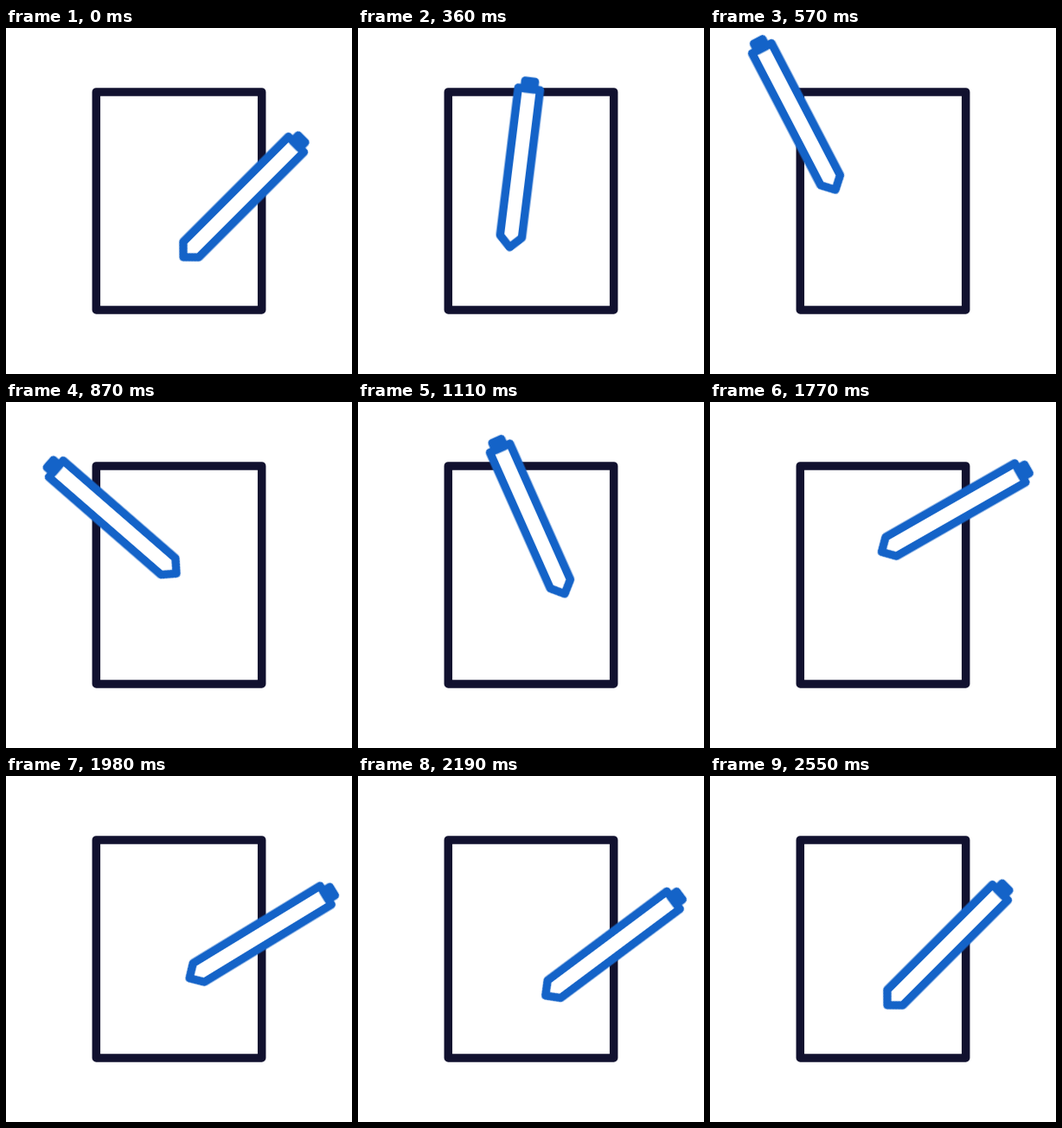
An HTML page without scripts for the animation above (2610 ms loop, 400 px wide and 400 px high).

```html
<!DOCTYPE html>
<html lang="en">
<head>
<meta charset="utf-8">
<title>Pencil and paper</title>
<style>
  html, body { margin: 0; width: 100%; height: 100%; overflow: hidden; background: #fff; }
  svg { display: block; width: 100%; height: 100%; }
  .paper, .pencil { fill: #fff; stroke-width: 9.5; stroke-linejoin: round; }
  .paper { stroke: #11112f; }
  .pencil { stroke: #1463c8; }
  .cap { fill: #1463c8; }

  .move-x, .move-y, .turn {
    --ease: cubic-bezier(.333, 0, .667, 1);
    --swing: cubic-bezier(.55, 0, .667, 1);
    animation: 2610ms var(--ease) infinite;
  }
  .move-x { animation-name: move-x; }
  .move-y { animation-name: move-y; }
  .turn { animation-name: turn; }

  @keyframes move-x {
    0% { transform: translateX(304px); animation-timing-function: cubic-bezier(.55, 0, .667, 1); }
    24.14%, 28.35% { transform: translateX(74px); }
    59%, 63.22% { transform: translateX(316.5px); }
    79.31% { transform: translateX(333.6px); }
    97.7%, 100% { transform: translateX(304px); }
  }
  @keyframes move-y {
    0% { transform: translateY(166px); animation-timing-function: cubic-bezier(.55, 0, .667, 1); }
    24.14% { transform: translateY(60px); }
    34.48% { transform: translateY(108px); }
    47.13% { transform: translateY(88px); }
    50.57%, 63.79% { transform: translateY(90.2px); }
    79.31% { transform: translateY(171px); }
    97.7%, 100% { transform: translateY(166px); }
  }
  @keyframes turn {
    0% { transform: rotate(45deg); }
    31.88% { transform: rotate(-49.6deg); }
    65.98% { transform: rotate(60.3deg); animation-timing-function: cubic-bezier(.63, 0, .6, 1); }
    97.7%, 100% { transform: rotate(45deg); }
  }
</style>
</head>
<body>
<svg viewBox="0 0 400 400">
  <rect class="paper" x="104.3" y="73.9" width="191.4" height="252"/>
  <g class="move-x"><g class="move-y"><g class="turn">
    <g class="pencil">
      <path d="M0 140 L-12.7 127.3 V-44.5 H12.7 V127.3 Z"/>
      <rect class="cap" x="-5.7" y="-53.4" width="11.4" height="8.9"/>
    </g>
  </g></g></g>
</svg>
</body>
</html>
```
